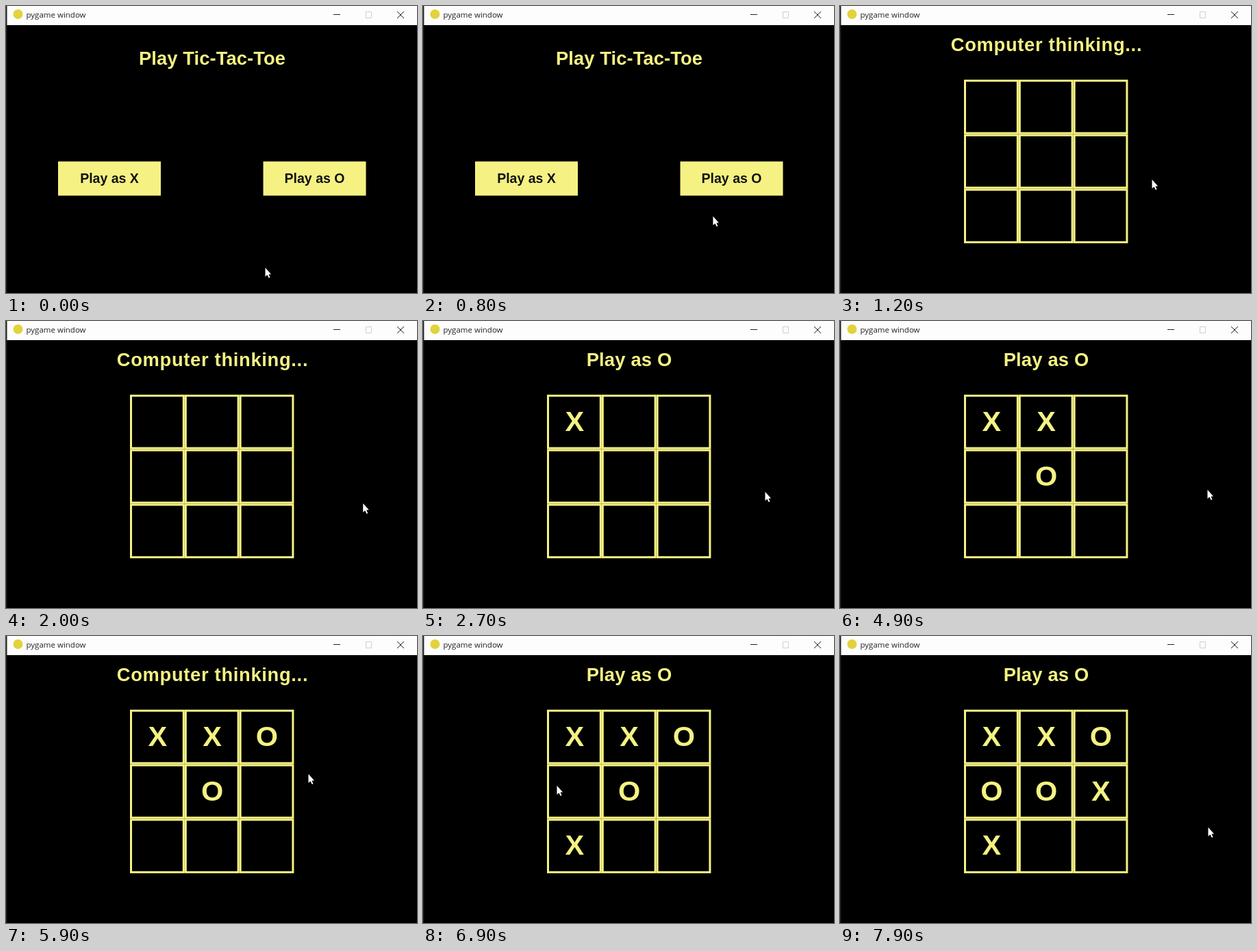
Recreate the animation shown at these times as an HTML page with a canvas. Size 600 by 420 pixels, loop 8 s.

```html
<!DOCTYPE html>
<html lang="en">
<head>
<meta charset="utf-8">
<title>Tic-Tac-Toe</title>
<style>
html, body { margin: 0; width: 100%; height: 100%; overflow: hidden; background: #000; }
canvas { display: block; }
</style>
</head>
<body>
<canvas id="stage" width="600" height="420"></canvas>
<script>
const ctx = document.getElementById('stage').getContext('2d');
const LOOP = 8000, STEP = 100, BOARD_AT = 1000;
const YELLOW = '#f5f283', CELL = 79.8, LEFT = 181, TOP = 107.8;

// Cells in the order played, X first
const played = [0, 4, 1, 2, 6, 3, 5];
// A round lasts 1800 ms; X answers O after 500 ms
const playTime = i => 2000 + 1800 * Math.ceil(i / 2) + (i % 2 ? 0 : 500);

// The pointer reaches each stop at the given time and rests there
const REST = 300;
const stops = [
  { t: 0, x: 379, y: 383 },
  { t: 1200, x: 456, y: 254 },
  { t: 2100, x: 527, y: 268 },
  { t: 2700, x: 500, y: 250 },
  { t: 3500, x: 305, y: 221 },
  { t: 4600, x: 537, y: 247 },
  { t: 5300, x: 374, y: 146 },
  { t: 6200, x: 510, y: 258 },
  { t: 6900, x: 196, y: 219 },
  { t: 7900, x: 538, y: 280 }
];

function pointerAt(t) {
  const i = Math.max(1, stops.findIndex(s => s.t >= t));
  const a = stops[i - 1], b = stops[i];
  const u = Math.max(0, (t - a.t - REST) / (b.t - a.t - REST));
  const ease = u * u * (3 - 2 * u);
  return [a.x + (b.x - a.x) * ease, a.y + (b.y - a.y) * ease];
}

function box(color, x, y, w, h) {
  ctx.fillStyle = color;
  ctx.fillRect(x, y, w, h);
}

function label(text, x, y, size, color = YELLOW, spacing = 0) {
  ctx.font = `bold ${size}px "Liberation Sans", Arial, sans-serif`;
  ctx.letterSpacing = spacing + 'px';
  ctx.textAlign = 'center';
  ctx.fillStyle = color;
  ctx.fillText(text, x, y);
  ctx.letterSpacing = '0px';
}

function line(color, d) {
  ctx.strokeStyle = color;
  ctx.lineWidth = 1;
  ctx.stroke(new Path2D(d));
}

function drawWindow() {
  box('#000', 0, 0, 600, 420);
  box('#fdfdfd', 0, 0, 600, 28);
  box('#1c1c1c', 0, 0, 1.5, 420);
  ctx.fillStyle = '#e3d23c';
  ctx.beginPath();
  ctx.arc(17.5, 12, 7, 0, 7);
  ctx.fill();
  ctx.font = '11.5px "Open Sans", "Noto Sans", sans-serif';
  ctx.textAlign = 'left';
  ctx.fillStyle = '#222';
  ctx.fillText('pygame window', 29.5, 17);
  line('#222', 'M478 12.5h10M571 8l10 10M581 8l-10 10');
  line('#cfcfcf', 'M525.5 8.5h8v9h-8z');
}

function drawMenu() {
  label('Play Tic-Tac-Toe', 301, 86, 27.3, YELLOW, 0.1);
  ['X', 'O'].forEach((mark, i) => {
    const x = 76 + i * 299.5;
    box(YELLOW, x, 227.5, 150, 50);
    label('Play as ' + mark, x + 75, 258.5, 19.5, '#111');
  });
}

function drawGame(t) {
  const done = played.filter((cell, i) => playTime(i) <= t);
  if (done.length % 2) label('Play as O', 301, 66, 27.3, YELLOW, 0.2);
  else label('Computer thinking...', 301.5, 66, 27.3, YELLOW, 0.7);

  const corner = cell => [LEFT + cell % 3 * CELL, TOP + Math.floor(cell / 3) * CELL];
  ctx.strokeStyle = YELLOW;
  ctx.lineWidth = 3;
  for (let cell = 0; cell < 9; cell++) {
    const [x, y] = corner(cell);
    ctx.strokeRect(x + 1.5, y + 1.5, CELL - 3, CELL - 3);
  }
  done.forEach((cell, i) => {
    const [x, y] = corner(cell);
    label(i % 2 ? 'O' : 'X', x + 40.3, y + 53, 41.5);
  });
}

function drawPointer(t) {
  ctx.save();
  ctx.translate(...pointerAt(t));
  ctx.fillStyle = '#fff';
  ctx.fill(new Path2D('M-.5 0V13L2.5 10.4L4.7 15L6.5 14.2L4.5 9.7L8 9.4Z'));
  ctx.restore();
}

function draw(now) {
  const t = Math.floor(now % LOOP / STEP) * STEP;
  drawWindow();
  if (t < BOARD_AT) drawMenu();
  else drawGame(t);
  drawPointer(t);
}

const start = performance.now();
function tick() {
  draw(performance.now() - start);
  requestAnimationFrame(tick);
}
tick();
</script>
</body>
</html>
```
